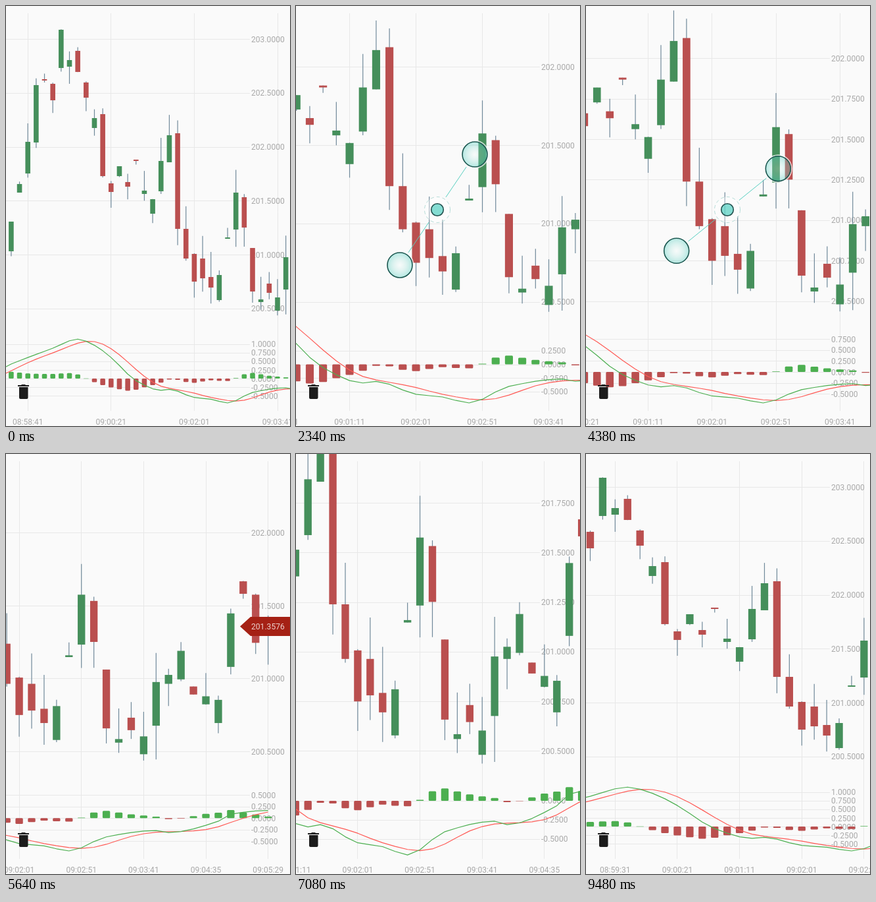
An HTML page with a canvas that plays this animation: 432x637 px, repeating every 9.54 s.

```html
<!DOCTYPE html>
<html lang="en">
<head>
<meta charset="utf-8">
<title>Candlestick chart</title>
<style>
html, body { margin: 0; width: 100%; height: 100%; overflow: hidden; background: #fafafa; }
canvas { display: block; }
</style>
</head>
<body>
<canvas id="chart" width="432" height="637"></canvas>
<script>
const ctx = document.getElementById('chart').getContext('2d');
const W = 432, LOOP = 9540, STEP = 60;
const UP = '#458f5b', DOWN = '#ba4f4f', GRID = '#e8e8e8', LABEL = '#a9a9a9';
const LAST_PRICE = 201.3576;

// Quotes: open and close of each candle, in ticks below the top level
const quotes = [
  [372, 327], [283, 270], [254, 206], [207, 120], [111, 113], [118, 143], [94, 36], [92, 82],
  [68, 100], [116, 139], [185, 170], [164, 258], [269, 282], [258, 243], [267, 274],
  [233, 235], [285, 280], [315, 293], [281, 235], [237, 196], [193, 338], [338, 383],
  [376, 418], [383, 413], [411, 427], [446, 408], [353, 351], [339, 283], [290, 336],
  [367, 433], [449, 445], [421, 435], [462, 442], [430, 381], [383, 373], [378, 346],
  [386, 395], [406, 397], [427, 401], [364, 304], [268, 282], [283, 337], [329, 318]
];
const tickPrice = v => 201 + (377 - v) / 163.5;

// Turning points of the fast indicator line: candle index, value
const turns = [
  [-4, -.02], [0, .42], [5, .88], [8, 1.145], [10, .965], [12, .61], [15, -.06], [18, -.342],
  [19, -.313], [22, -.55], [24, -.6], [26, -.709], [29, -.405], [33, -.268], [34, -.312],
  [38, -.065], [39, .086], [42, .167]
];

// time, candle spacing, index at the right edge, px per price unit, px per indicator unit
const view = [
  [1200, 12.66, 33.5, 163.5, 52.2],
  [1320, 13, 34.35, 163.5, 52.2],
  [1680, 13, 34.35, 163.5, 52.2],
  [2340, 20.2, 34.35, 237.6, 82.5],
  [3360, 15.5, 34.35, 163.5, 52.2],
  [4380, 19.45, 34.35, 245.5, 66.3],
  [5640, 18.93, 43.76, 221, 70],
  [6200, 18.93, 46.9, 330, 125],
  [7080, 18.93, 39.86, 301, 116],
  [8400, 18.93, 28.3, 165, 52.5],
  [9480, 18.93, 27.48, 163.5, 52.2]
];

// Monotone cubic interpolation through keyframe rows
function sample(keys, t) {
  const end = keys.length - 1;
  if (t <= keys[0][0]) return keys[0];
  if (t >= keys[end][0]) return keys[end];
  let n = 0;
  while (t >= keys[n + 1][0]) n++;
  const slope = (j, c) => j < 0 || j >= end ? 0
    : (keys[j + 1][c] - keys[j][c]) / (keys[j + 1][0] - keys[j][0]);
  const tangent = (j, c) => {
    const a = slope(j - 1, c), b = slope(j, c);
    return a * b <= 0 ? 0 : 2 * a * b / (a + b);
  };
  const h = keys[n + 1][0] - keys[n][0], u = (t - keys[n][0]) / h;
  return keys[n].map((v, c) => c === 0 ? t
    : v + (keys[n + 1][c] - v) * u * u * (3 - 2 * u)
      + h * u * (1 - u) * ((1 - u) * tangent(n, c) - u * tangent(n + 1, c)));
}

const fast = i => sample(turns, i)[1];
const signal = i => (fast(i) + fast(i - 1) + fast(i - 2) + fast(i - 3)) / 4;

let seed = 11;
const random = () => (seed = seed * 16807 % 2147483647) / 2147483647;
const wick = () => 38 * random() ** 2;
const candles = quotes.map(([open, close]) => {
  const top = Math.min(open, close), bottom = Math.max(open, close);
  return {
    color: close < open ? UP : DOWN,
    levels: [top - wick(), top, bottom, bottom + wick()].map(tickPrice)
  };
});

function line(x1, y1, x2, y2, color, width = 1) {
  ctx.strokeStyle = color;
  ctx.lineWidth = width;
  ctx.beginPath();
  ctx.moveTo(x1, y1);
  ctx.lineTo(x2, y2);
  ctx.stroke();
}

function text(str, x, y, color, align = 'left') {
  ctx.font = '12.1px Roboto, Arial, sans-serif';
  ctx.textBaseline = 'middle';
  ctx.textAlign = align;
  ctx.fillStyle = color;
  ctx.fillText(str, x, y + 1);
}

function disc(x, y, r, fill, stroke, width) {
  ctx.beginPath();
  ctx.arc(x, y, r, 0, 7);
  ctx.fillStyle = fill;
  ctx.fill();
  ctx.strokeStyle = stroke;
  ctx.lineWidth = width;
  ctx.stroke();
}

function clock(i) {
  const s = Math.round(32301 + 10 * i + .8 * Math.max(0, i - 32));
  return [s / 3600, s / 60 % 60, s % 60].map(v => String(Math.floor(v)).padStart(2, '0')).join(':');
}

function axis(step, from, to, yOf, top, bottom) {
  for (let v = from; v <= to; v += step) {
    const y = yOf(v);
    if (y < top || y > bottom) continue;
    line(0, Math.round(y) + .5, 371, Math.round(y) + .5, GRID);
    text(v.toFixed(4), 373, y, LABEL);
  }
}

function curve(value, xOf, yOf, color) {
  ctx.strokeStyle = color;
  ctx.lineWidth = 1.2;
  ctx.lineJoin = 'round';
  ctx.beginPath();
  for (let i = -1; i < candles.length; i++) ctx.lineTo(xOf(i), yOf(value(i)));
  ctx.stroke();
}

function trash() {
  ctx.fillStyle = '#1c1c1c';
  ctx.fillRect(23.5, 574, 6, 2);
  ctx.fillRect(18, 575, 17, 2);
  ctx.beginPath();
  ctx.roundRect(20, 578, 13.5, 18, [0, 0, 2, 2]);
  ctx.fill();
}

function priceTag(y) {
  ctx.fillStyle = '#a52115';
  ctx.beginPath();
  [[356, 0], [372, -14.5], [W, -14.5], [W, 14.5], [372, 14.5]].forEach(([x, d]) => ctx.lineTo(x, y + d));
  ctx.fill();
  text(LAST_PRICE.toFixed(4), 373, y, '#ecd0cc');
}

// Two fingers mirrored about the centre; they part as the zoom grows and turn slowly
function fingers(t, gap) {
  const cx = 215, cy = 309, reach = 42.5 + 2.92 * gap;
  const angle = Math.min(1.05, .66 + .314 * Math.exp((2340 - t) / 720));
  ctx.setLineDash([5, 4]);
  disc(cx, cy, 19.5, 'rgba(255,255,255,.35)', '#b5dcd7', 1);
  ctx.setLineDash([]);
  disc(cx, cy, 9.3, 'rgba(75,205,190,.68)', '#23514f', 1.6);
  for (const side of [1, -1]) {
    const dx = side * Math.cos(angle), dy = -side * Math.sin(angle);
    const x = cx + dx * reach, y = cy + dy * reach;
    line(cx + dx * 23, cy + dy * 23, x - dx * 23, y - dy * 23, '#58cfc0');
    const glow = ctx.createRadialGradient(x, y, 0, x, y, 19);
    glow.addColorStop(0, 'rgba(240,252,250,.25)');
    glow.addColorStop(.4, 'rgba(170,230,222,.28)');
    glow.addColorStop(1, 'rgba(80,205,190,.42)');
    disc(x, y, 20.5, 'transparent', 'rgba(255,255,255,.7)', 2);
    disc(x, y, 19, glow, '#1c5750', 1.6);
  }
}

function draw(t) {
  const [, gap, right, scale, macdScale] = sample(view, t);
  const sag = Math.max(0, scale - 250) / 5;
  const xOf = i => W - (right - i) * gap;
  const yOf = p => 481 + sag - (p - 200.364) * scale;
  const macdY = v => 602 + .6 * sag - (v + .709) * macdScale;
  const width = gap * .6;

  ctx.fillStyle = '#fafafa';
  ctx.fillRect(0, 0, W, 637);

  for (let i = 2; i < candles.length; i += gap > 17 ? 5 : 10) {
    const x = Math.round(xOf(i) - .5) + .5;
    line(x, 11, x, 614, GRID);
    text(clock(i), xOf(i), 630, LABEL, 'center');
  }
  axis(scale >= 240 ? .25 : .5, 200, 204, yOf, 22, 495);
  axis(.25, -.75, 1.5, macdY, 504, 603);

  candles.forEach(({ color, levels }, i) => {
    const x = xOf(i), [high, top, bottom, low] = levels.map(yOf);
    line(x, high, x, low, '#70899a', 1.2);
    ctx.fillStyle = color;
    ctx.fillRect(x - width / 2, top, width, Math.max(1.5, bottom - top));

    const diff = fast(i) - signal(i), h = Math.max(.6, Math.abs(diff) * macdScale);
    ctx.fillStyle = diff > 0 ? '#4caf50' : DOWN;
    ctx.beginPath();
    ctx.roundRect(x - width / 2, macdY(Math.max(0, diff)), width, h, Math.min(1.5, h / 2));
    ctx.fill();
  });
  curve(signal, xOf, macdY, '#ff5a55');
  curve(fast, xOf, macdY, '#4caf50');

  trash();
  if (xOf(candles.length - 1) < W) priceTag(yOf(LAST_PRICE));
  if (t >= 1260 && t < 4620) fingers(t, gap);
}

const start = performance.now();
function tick() {
  const t = (performance.now() - start) % LOOP;
  draw(Math.floor(t / STEP) * STEP);
  requestAnimationFrame(tick);
}
tick();
</script>
</body>
</html>
```
